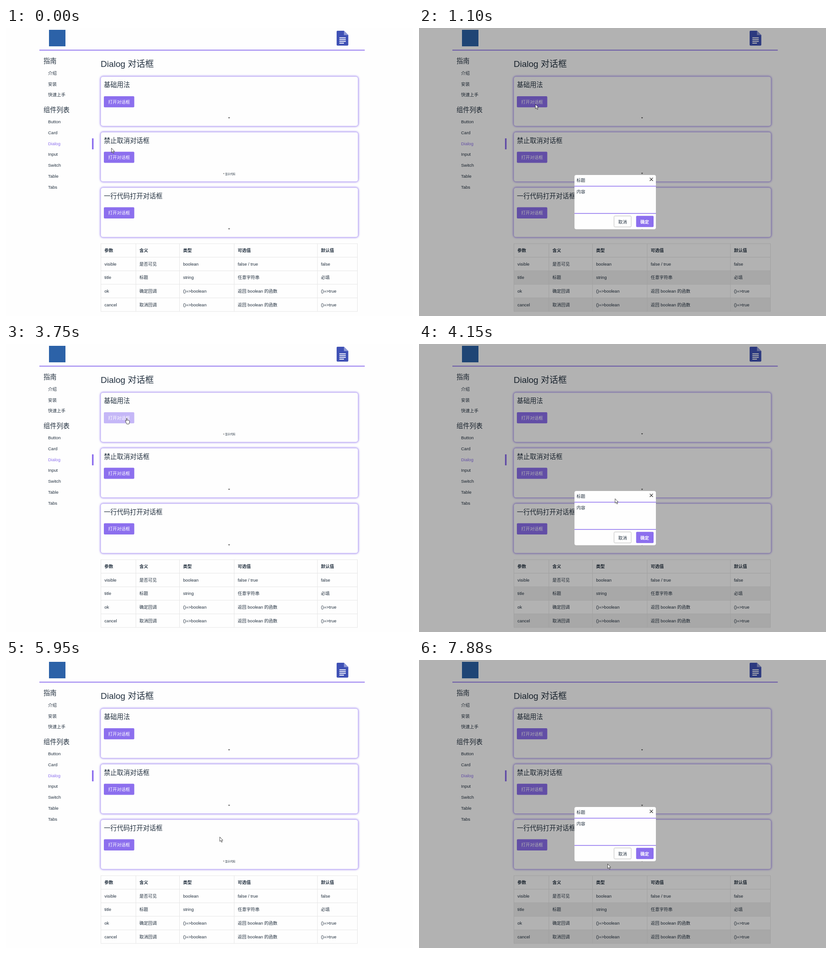
Write an HTML page that moves like this. It is 890 px wide and 629 px high and loops after 8000 ms.

```html
<!DOCTYPE html>
<html>
<head>
<meta charset="utf-8">
<style>
html, body { margin: 0; width: 100%; height: 100%; overflow: hidden }
svg {
  display: block; background: #fefefe; --main: #8c6fee; --pale: #c5b7f7;
  font-family: "Liberation Sans", Arial, "Noto Sans CJK SC", "Noto Sans CJK", sans-serif;
}
text { fill: #22303f; white-space: pre }
.main { fill: var(--main) }
.bold { font-weight: bold }
.white { fill: #fff }
.frame { fill: #fefefe; stroke: var(--pale); filter: drop-shadow(0 0 2px var(--main)) }
.on .main { fill: var(--pale) }
.alt, .tip { display: none }
.dim .alt, .hot .tip { display: inline }
.hot .icon { display: none }
</style>
</head>
<body>
<svg id="stage" width="890" height="629" viewBox="0 0 890 629"></svg>
<script>
const stage = document.getElementById('stage');
const $ = id => document.getElementById(id);

// Text placed by its left edge and vertical centre
const text = (x, cy, s, size = 9.5, cls = '') =>
  `<text x="${x}" y="${cy + size * .37}" font-size="${size}" class="${cls}">${s}</text>`;
const rect = (x, y, w, h, attrs = '') =>
  `<rect x="${x}" y="${y}" width="${w}" height="${h}" ${attrs}/>`;
const repeat = (n, make) => Array.from({ length: n }, (_, i) => make(i)).join('');

const header = () =>
  rect(94, 4, 36, 36, 'fill="#2c62a8"') +
  rect(73, 47.5, 711.5, 1.8, 'class="main"') +
  `<path d="M725 6H739L748.5 15.5V36.500Q748.5 38.5 746.5 38.5H725Q723 38.5 723 36.5V8Q723 6 725 6Z" fill="#3f51b5"/>
   <path d="M739 6 748.5 15.5H739Z" fill="#8c98d6"/>` +
  repeat(4, i => rect(729, 20.5 + i * 3.9, i < 3 ? 14 : 10, 1.9, 'class="white"'));

const sidebar = () => {
  const group = (title, y, names) => text(82, y, title, 14.25) +
    names.map((s, i) => text(92, y + 26.5 + i * 23.7, s, 9.5, s == 'Dialog' ? 'main' : '')).join('');
  return group('指南', 71.8, ['介绍', '安装', '快速上手']) +
    group('组件列表', 178.3, ['Button', 'Card', 'Dialog', 'Input', 'Switch', 'Table', 'Tabs']) +
    rect(188, 241, 3.5, 24, 'class="main"');
};

const cardTop = i => 106 + i * 121.3;
const card = (title, i) => `<g id="card${i}" transform="translate(207 ${cardTop(i)})">
  ${rect(0, 0, 563, 108.3, 'rx="5" class="frame"')}
  ${text(7, 18, title, 14.25)}
  <g id="open${i}">${rect(7, 43, 66.5, 24.3, 'rx="2" class="main"')}
  ${text(16.5, 55.2, '打开对话框', 9.5, 'white')}</g>
  <path class="icon" d="M278.8 89h4l-2 3z" fill="#555"/>
  <g class="tip"><path d="M267.8 90h2.8l-1.4 2z" fill="#555"/>
  ${text(272, 91.2, '显示代码', 5.6)}</g></g>`;

const table = () => {
  const edges = [207.5, 284, 379.5, 499, 681, 768.5];
  const rowY = i => 471 + i * 29.6;
  const rows = [
    '参数|含义|类型|可选值|默认值',
    'visible|是否可见|boolean|false / true|false',
    'title|标题|string|任意字符串|必填',
    'ok|确定回调|()=&gt;boolean|返回 boolean 的函数|()=&gt;true',
    'cancel|取消回调|()=&gt;boolean|返回 boolean 的函数|()=&gt;true'
  ];
  const stripes = repeat(2, i => rect(207.5, rowY(2 * i + 2), 561, 29.6, 'class="alt" fill="#f0f0f0"'));
  const grid = edges.map(x => `M${x} 471V619`).join('') + repeat(6, i => `M207 ${rowY(i)}H769`);
  return stripes + `<path d="${grid}" stroke="#e6e6e6"/>` +
    rows.map((row, i) => row.split('|').map((s, j) =>
      text(edges[j] + 7.7, rowY(i) + 14.6, s, 9.5, i ? '' : 'bold')).join('')).join('');
};

const dialog = () => `<g id="dialog">
  ${rect(0, 0, 890, 629, 'opacity=".3"')}
  ${rect(340, 321, 178, 118.5, 'rx="4" fill="#fefefe"')}
  <path d="M340 345.5H518M340 405H518" stroke="var(--main)" stroke-width="1.5"/>
  <path d="M504.7 327.2l6.8 6.8m0-6.8l-6.8 6.8" stroke="#222" stroke-width="1.1"/>
  ${text(344.5, 332.3, '标题')}${text(344.5, 357.5, '内容')}
  <g id="cancel">${rect(426.5, 410.5, 37.5, 24, 'id="cancelBox" rx="2" fill="#fff"')}
  ${text(435.7, 423, '取消')}</g>
  <rect id="okBox" y="410.3" height="24.4" rx="2"/>
  ${text(484, 423, '确定', 9.5, 'bold white')}
  <circle id="spinner" cx="478" cy="422.5" r="3.5" fill="none" stroke="#7558d6" stroke-width="1.1" stroke-dasharray="14.5 7.5"/>
</g>`;

const cursors = () => `<g stroke="#222" stroke-width=".8" fill="#fff" stroke-linejoin="round">
  <path id="arrow" d="M.5 .5V10.2L2.7 8.2 4.4 12 6 11.3 4.4 7.7H7.3Z"/>
  <path id="hand" d="M0 13.3-3 6.5Q-3-4.5-.8 6.5V1Q0-.5.9 1V4.8L4.400 5.200Q6 5.500 6 7V9.500L5 13.300Z"/></g>`;

stage.innerHTML = header() + sidebar() + text(207, 78, 'Dialog 对话框', 19) +
  ['基础用法', '禁止取消对话框', '一行代码打开对话框'].map(card).join('') +
  table() + dialog() + cursors();
$('hand').setAttribute('d', 'M0 13.3-3 6.5Q-3 4.500-.8 6.500V1Q0-.5.9 1V4.8L4.400 5.200Q6 5.500 6 7V9.500L5 13.300Z');

// Pointer moves: start, end, and the point reached
const moves = [
  [0, 270, 241, 231], [270, 680, 253, 169], [680, 830, 254, 166],
  [1510, 1990, 449, 398], [1990, 2200, 444, 427], [2840, 3080, 446, 425],
  [3080, 3360, 292, 221], [3360, 3630, 264, 161.5], [3760, 3880, 300, 178],
  [3880, 4510, 490, 414], [4870, 5230, 467, 386],
  [6080, 6700, 282, 286], [6700, 6850, 272.5, 284], [7600, 7880, 412, 445]
];
const easeOut = p => p * (2 - p);

function pointer(t) {
  let x = 230, y = 262;
  for (const [from, to, toX, toY] of moves) {
    if (t < from) break;
    const p = easeOut(Math.min(1, (t - from) / (to - from)));
    x += (toX - x) * p;
    y += (toY - y) * p;
  }
  return [x, y];
}

const within = (v, a, b) => v >= a && v < b;
const show = (id, on) => $(id).style.display = on ? '' : 'none';
const set = (id, attrs) => {
  for (const k in attrs) $(id).setAttribute(k, attrs[k]);
};

function draw(t) {
  const [x, y] = pointer(t);
  const open = within(t, 980, 2810) || within(t, 3880, 5830) || t >= 7450;
  const loading = within(t, 4870, 5830);
  const onRow = open && !loading && within(y, 410, 435);
  const overCancel = onRow && within(x, 426, 464);
  const overOk = onRow && within(x, 475, 513);
  let hand = overCancel || overOk;

  stage.classList.toggle('dim', open);
  for (let i = 0; i < 3; i++) {
    const localY = y - cardTop(i);
    const over = !open && within(localY, 0, 108.3);
    const overButton = over && within(x, 214, 281) && within(localY, 43, 67.3);
    $('card' + i).classList.toggle('hot', over);
    $('open' + i).classList.toggle('on', overButton);
    hand ||= overButton;
  }

  show('dialog', open);
  show('spinner', loading);
  set('cancel', { transform: `translate(${loading ? -10.7 : 0})` });
  set('cancelBox', { stroke: overCancel ? 'var(--main)' : '#bdbdbd' });
  $('cancel').lastElementChild.style.fill = overCancel ? 'var(--pale)' : '';
  set('okBox', {
    x: loading ? 464 : 474.8, width: loading ? 49 : 38.2,
    fill: loading ? '#ab98f2' : overOk ? 'var(--pale)' : 'var(--main)'
  });
  set('spinner', { transform: `rotate(${(t - 5710) * .36 - 120} 478 422.5)` });

  show('arrow', !hand);
  show('hand', hand);
  set(hand ? 'hand' : 'arrow', { transform: `translate(${x} ${y})` });
}

const start = performance.now();
function tick() {
  draw((performance.now() - start) % 8000);
  requestAnimationFrame(tick);
}
tick();
</script>
</body>
</html>
```
